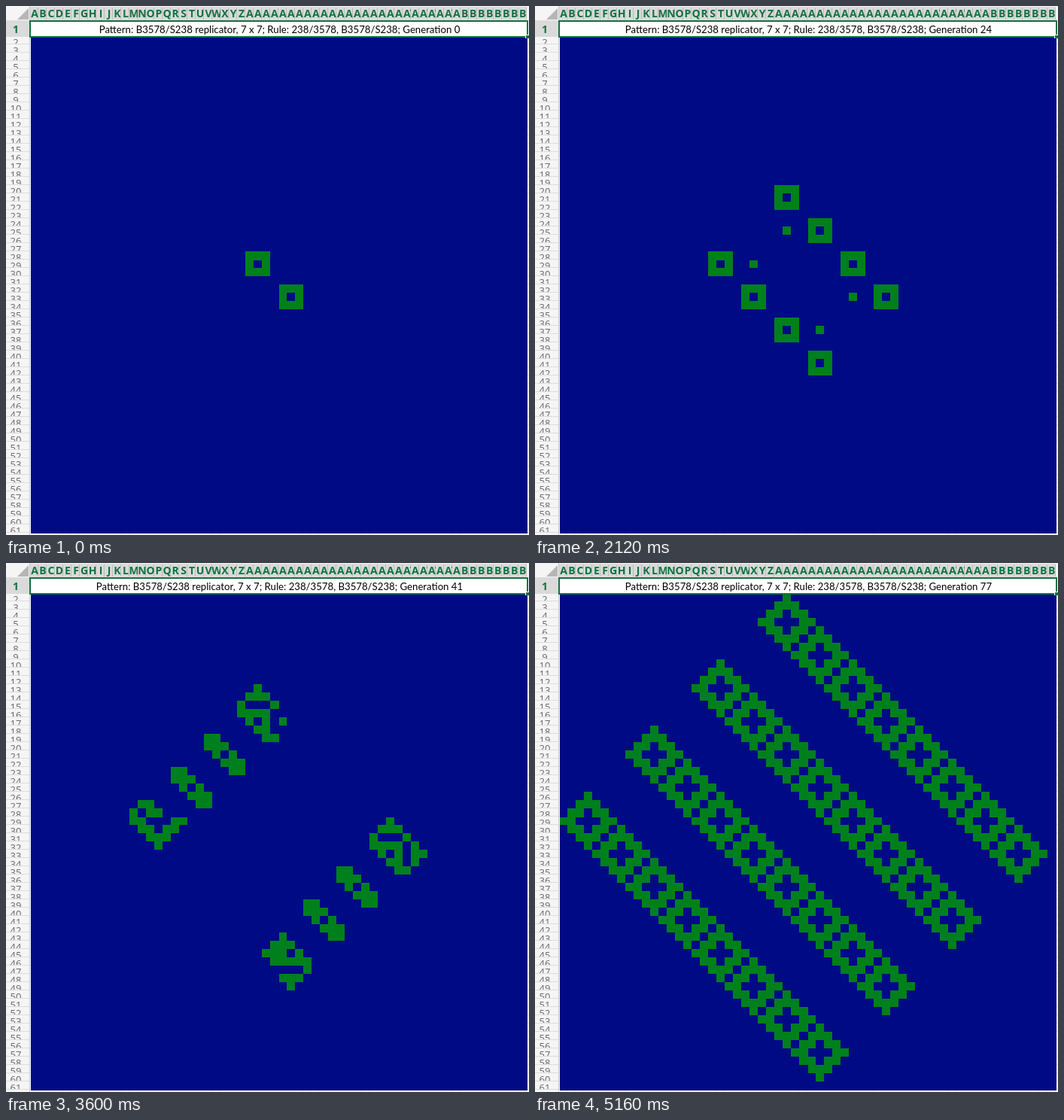
Recreate the animation shown at these times as an HTML page with a canvas. Size 695x703 px, loop 5.24 s.

```html
<!DOCTYPE html>
<html lang="en">
<head>
<meta charset="utf-8">
<title>Replicator in a spreadsheet</title>
<style>
html, body { margin: 0; width: 100%; height: 100%; overflow: hidden; background: #fff; }
canvas { display: block; }
</style>
</head>
<body>
<canvas id="stage" width="695" height="703"></canvas>
<script>
const W = 695, H = 703, N = 60, CELL = 11, LEFT = 32, TOP = 40;
const LOOP = 5240, SLOT = 40;
const SPLIT_COL = 30, SPLIT_ROW = 27;
const NAVY = '#000a85', LIVE = '#00801c', ACCENT = '#107240';
const HEAD_FONT = '"Open Sans", "Noto Sans", sans-serif';

const canvas = document.getElementById('stage');
const ctx = canvas.getContext('2d');

// Cells at the tile seams start one pixel late.
const colX = c => LEFT + CELL * c + (c === SPLIT_COL ? 1 : 0);
const rowY = r => TOP + CELL * r + (r === SPLIT_ROW ? 1 : 0);

function rect(g, color, x, y, w, h) {
  g.fillStyle = color;
  g.fillRect(x, y, w, h);
}

// ---- Life-like rule B3578/S238 ----
const BORN = [3, 5, 7, 8], STAY = [2, 3, 8];

function seedGrid() {
  const grid = new Uint8Array(N * N);
  for (const mid of [27, 31])
    for (let dy = -1; dy <= 1; dy++)
      for (let dx = -1; dx <= 1; dx++)
        if (dx || dy) grid[(mid + dy) * N + mid + dx] = 1;
  return grid;
}

function neighbours(grid, x, y) {
  let n = 0;
  for (let v = Math.max(0, y - 1); v <= Math.min(N - 1, y + 1); v++)
    for (let u = Math.max(0, x - 1); u <= Math.min(N - 1, x + 1); u++)
      if (u !== x || v !== y) n += grid[v * N + u];
  return n;
}

function evolve(grid) {
  return grid.map((alive, i) =>
    (alive ? STAY : BORN).includes(neighbours(grid, i % N, Math.floor(i / N))) ? 1 : 0);
}

const history = [seedGrid()];
while (history.length <= 77) history.push(evolve(history[history.length - 1]));

// ---- Timeline: each refresh repaints some of four tiles, then the rest ----
const EVEN = [0, 120, 240, 360, 480];
const BURSTS = [
  [40, [1, 2, 3, 4, 5], EVEN],
  [600, [6, 7, 8, 9, 10], EVEN],
  [1160, [11, 13, 14, 16, 17], EVEN],
  [1720, [19, 21, 22, 24, 25], EVEN],
  [2280, [27, 28, 29, 30, 32], EVEN],
  [2880, [33, 35, 36, 37, 39], [0, 120, 200, 320, 440]],
  [3480, [41, 43, 46, 48, 50], EVEN],
  [4040, [53, 55, 58, 60, 63], EVEN],
  [4600, [65, 67, 70, 72, 74], [0, 120, 240, 360, 520]],
  [5160, [77], EVEN]
];
// Bits: 1 upper left, 2 upper right, 4 lower left, 8 lower right.
const FIRST_TILES = [1, 9, 3, 6, 4], ALL = 15;

const events = [];
for (const [start, gens, offsets] of BURSTS) {
  gens.forEach((gen, i) => {
    const at = start + offsets[i];
    if (gen === 1 || gen === 77) {
      events.push([at, gen, ALL]);
      return;
    }
    events.push([at, gen, FIRST_TILES[i]]);
    if (gen === 39) events.push([at + SLOT, gen, 6]);
    const full = at + SLOT * (gen === 39 ? 2 : 1);
    if (gen !== 74) events.push([full, gen, ALL]);
  });
}

function tilesAt(time) {
  const tiles = [0, 0, 0, 0];
  for (const [at, gen, mask] of events) {
    if (at > time) break;
    for (let i = 0; i < 4; i++) if (mask >> i & 1) tiles[i] = gen;
  }
  return tiles;
}

// ---- Sheet chrome, drawn once ----
function columnName(c) {
  const letter = String.fromCharCode(65 + c % 26);
  return c < 26 ? letter : String.fromCharCode(64 + Math.floor(c / 26)) + letter;
}

function clippedText(g, text, x, y, w, h, textX, baseline) {
  g.save();
  g.beginPath();
  g.rect(x, y, w, h);
  g.clip();
  g.fillText(text, textX, baseline);
  g.restore();
}

function drawChrome(g) {
  rect(g, '#fff', 0, 0, W, H);
  rect(g, '#f5f5f5', 0, 0, LEFT, H);
  rect(g, '#f5f5f5', 0, 0, W, 20);
  rect(g, '#dadada', LEFT, 1, N * CELL, 18);

  g.fillStyle = '#b6b6b6';
  g.beginPath();
  g.moveTo(30, 3);
  g.lineTo(30, 18);
  g.lineTo(15, 18);
  g.fill();

  g.font = 'bold 14px ' + HEAD_FONT;
  for (let c = 0; c < N; c++) {
    const x = LEFT + c * CELL, name = columnName(c);
    rect(g, '#bcbcbc', x + CELL - 1, 2, 1, 16);
    g.fillStyle = ACCENT;
    g.textAlign = c < 26 ? 'center' : 'left';
    clippedText(g, name, x, 0, CELL, 18, c < 26 ? x + 6 : x + 1, 15);
  }

  rect(g, '#dadada', 0, 20, 31, 21);
  g.fillStyle = ACCENT;
  g.textAlign = 'center';
  g.fillText('1', 13, 36);

  g.font = '13px ' + HEAD_FONT;
  for (let r = 0; r < N; r++) {
    const y = TOP + CELL * r;
    g.fillStyle = '#666';
    clippedText(g, String(r + 2), 0, y, 31, CELL, 13, y + 13);
    rect(g, '#dcdcdc', 0, y + CELL - 1, 31, 1);
    rect(g, '#e1e1e1', 693, y + CELL - 1, 2, 1);
    rect(g, '#e1e1e1', LEFT + r * CELL + CELL - 1, 701, 1, 2);
  }
  rect(g, '#c6c6c6', 31, 0, 1, H);
  rect(g, '#dcdcdc', 0, 19, 31, 1);
}

const chrome = document.createElement('canvas');
chrome.width = W;
chrome.height = H;
drawChrome(chrome.getContext('2d'));

// ---- Moving part ----
function drawCells(tiles) {
  rect(ctx, NAVY, 33, 41, 660, 660);
  for (let r = 0; r < N; r++) {
    for (let c = 0; c < N; c++) {
      const tile = (c >= SPLIT_COL ? 1 : 0) + (r >= SPLIT_ROW ? 2 : 0);
      if (!history[tiles[tile]][r * N + c]) continue;
      const x = Math.max(33, colX(c)), y = rowY(r);
      rect(ctx, LIVE, x, y, colX(c + 1) - x, rowY(r + 1) - y);
    }
  }
}

function drawTitle(gen) {
  rect(ctx, '#fff', 33, 21, 660, 20);
  ctx.fillStyle = '#000';
  ctx.font = '13.2px Lato, sans-serif';
  ctx.textAlign = 'center';
  ctx.fillText('Pattern: B3578/S238 replicator, 7 x 7; Rule: 238/3578, B3578/S238; Generation ' + gen, 363.5, 36);
  rect(ctx, ACCENT, 31, 19, 663, 2);
  rect(ctx, ACCENT, 31, 40, 663, 2);
  rect(ctx, ACCENT, 31, 19, 2, 23);
  rect(ctx, ACCENT, 692, 19, 2, 23);
  rect(ctx, '#fff', 690, 38, 5, 5);
  rect(ctx, ACCENT, 691, 39, 4, 4);
}

let shown = '';
function frame(now) {
  const tiles = tilesAt(now % LOOP);
  const key = tiles.join();
  if (key !== shown) {
    shown = key;
    ctx.drawImage(chrome, 0, 0);
    drawCells(tiles);
    drawTitle(tiles[1]);
  }
  requestAnimationFrame(frame);
}
frame(performance.now());
</script>
</body>
</html>
```
